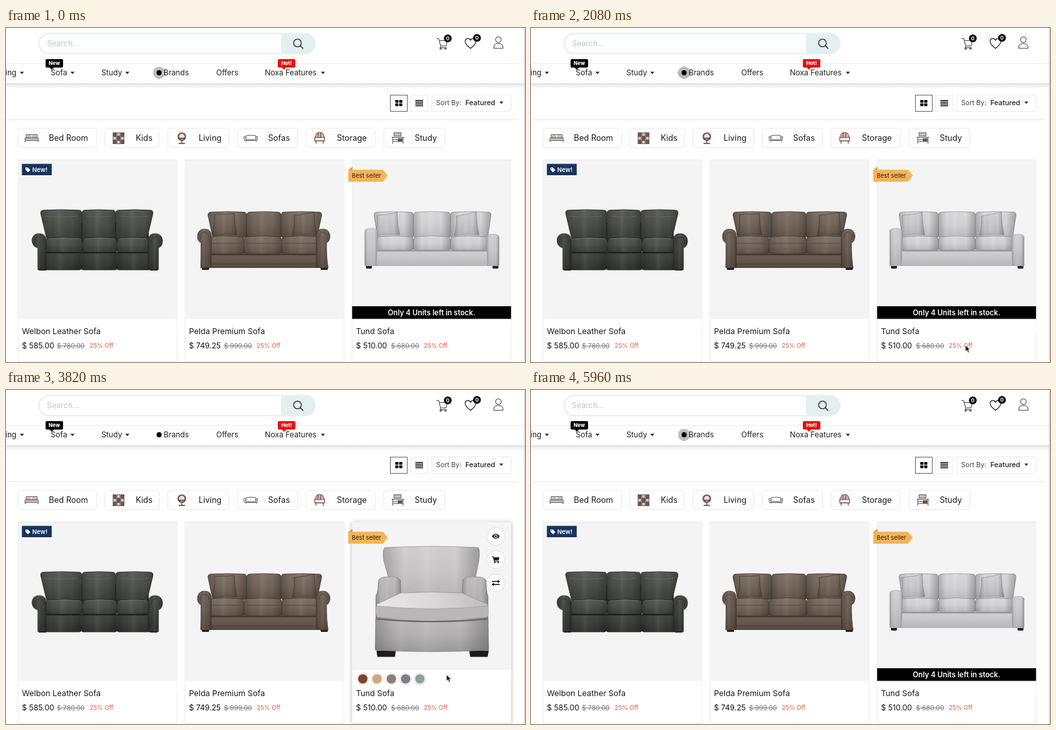
An HTML page for the animation above (6 s loop, 800 by 515 pixels).

```html
<!DOCTYPE html>
<html lang="en">
<head>
<meta charset="utf-8">
<title>Sofa shop</title>
<style>
html, body { margin: 0; width: 100%; height: 100%; overflow: hidden; background: #fff; }
svg { display: block; width: 800px; height: 515px; font-family: Inter, "Open Sans", sans-serif; }
#halo { transform-box: fill-box; transform-origin: center; }
</style>
</head>
<body>
<svg id="stage" viewBox="0 0 800 515" xmlns="http://www.w3.org/2000/svg"></svg>
<script>
const LOOP = 6000;
const stage = document.getElementById('stage');

// Drawing helpers return SVG markup.
const rect = (x, y, w, h, fill, r = 0, more = '') =>
  `<rect x="${x}" y="${y}" width="${w}" height="${h}" rx="${r}" fill="${fill}" ${more}/>`;
const circle = (x, y, r, fill, more = '') => `<circle cx="${x}" cy="${y}" r="${r}" fill="${fill}" ${more}/>`;
const path = (d, fill = 'none', more = '') => `<path d="${d}" fill="${fill}" ${more}/>`;
const line = (d, color, w = 1) => path(d, 'none', `stroke="${color}" stroke-width="${w}" stroke-linecap="round" stroke-linejoin="round"`);
const text = (x, y, s, size, fill = '#1b1b1b', more = '') =>
  `<text x="${x}" y="${y}" font-size="${size}" fill="${fill}" ${more}>${s}</text>`;
const group = (id, body, more = '') => `<g id="${id}" ${more}>${body}</g>`;
const at = (x, y, body) => `<g transform="translate(${x} ${y})">${body}</g>`;
const edge = (c, w = 1) => `stroke="${c}" stroke-width="${w}"`;
const caret = x => path(`M${x - 3.2} 67.5h6.4l-3.2 3.6z`, '#222');
const ramp = (id, ...stops) => `<linearGradient id="${id}" x1="0" y1="0" x2="0" y2="1">` +
  stops.map((c, i) => `<stop offset="${i / (stops.length - 1)}" stop-color="${c}"/>`).join('') + '</linearGradient>';

const defs = `<defs>
${ramp('headShade', '#dfe1e3', '#f4f5f5', '#fff')}
${ramp('leather', '#565853', '#4b4d48', '#3a3c38')}
${ramp('leatherLow', '#464843', '#3c3e3a', '#2f312e')}
${ramp('cloth', '#7d6f63', '#73655a', '#5f5248')}
${ramp('clothLow', '#6f6156', '#665850', '#544840')}
${ramp('linen', '#dadadc', '#d2d2d4', '#bdbdc0')}
${ramp('linenLow', '#d2d2d4', '#c8c8cb', '#b5b5b9')}
${ramp('wool', '#d2d0d0', '#c9c7c7', '#b8b6b6')}
${ramp('woolLow', '#bfbdbe', '#b3b1b2', '#9c9a9c')}
<linearGradient id="lit"><stop offset="0" stop-color="#e9e7e7"/><stop offset=".5" stop-color="#dad8d8"/><stop offset="1" stop-color="#bdbbbc"/></linearGradient>
<linearGradient id="sheen"><stop offset="0" stop-opacity=".2"/><stop offset=".22" stop-opacity="0"/><stop offset=".45" stop-color="#fff" stop-opacity=".07"/><stop offset=".75" stop-opacity="0"/><stop offset="1" stop-opacity=".25"/></linearGradient>
<filter id="soft" x="-10%" y="-10%" width="120%" height="120%"><feGaussianBlur stdDeviation="3"/></filter>
</defs>`;

function header() {
  const badge = (x, y) => circle(x, y, 6, '#000') + text(x, y + 2.8, 0, 8, '#fff', 'text-anchor="middle" font-weight="700"');
  const flag = (x, label, fill) => rect(x, 48, 27, 13, fill, 2) + path(`M${x + 6} 60.5h7l-3.5 4z`, fill) +
    text(x + 13.5, 57.4, label, 7.8, '#fff', 'text-anchor="middle" font-weight="800"');
  const nav = [[69, 'Sofa'], [147, 'Study'], [243, 'Brands'], [324, 'Offers'], [399, 'Noxa Features']];
  return path('M424 8h37a16 16 0 0 1 0 32h-37z', '#e5eff2') +
    rect(51, 8.5, 425, 31, 'none', 15.5, edge('#e7eef0', 2)) +
    text(63, 28, 'Search...', 12, '#c4c4c4') +
    circle(449.3, 23, 5.9, 'none', edge('#222', 1.3)) + line('M453.7 27.5l4 4', '#222', 1.4) +
    line('M664 16.2h3l3 11.6h8.3l2-8.5h-11.6M670 28.5l-1 2h10', '#333') +
    circle(670, 32, 1.2, 'none', edge('#333')) + circle(677.5, 32, 1.2, 'none', edge('#333')) + badge(681, 16) +
    line('M716 31.5C711 27.5 707.7 24.5 707.7 20.7c0-5 6-6.2 8.3-1.6 2.3-4.6 8.3-3.4 8.3 1.6 0 3.8-3.3 6.8-8.3 10.8z', '#222', 1.2) + badge(726, 15.3) +
    circle(759, 18, 4.3, 'none', edge('#444', 1.1)) + line('M752 31.3v-2.5c0-6.5 14-6.5 14 0v2.5z', '#444', 1.1) +
    rect(0, 54, 799, 1, '#ececec') + rect(0, 85, 799, 10, 'url(#headShade)') +
    text(16, 73, 'Living', 11.7, '#222', 'text-anchor="end"') +
    nav.map(([x, s]) => text(x, 73, s, 11.7, '#222')).join('') +
    [24.5, 102.5, 187, 488.5].map(caret).join('') +
    flag(61, 'New', '#000') + flag(419, 'Hot!', '#e3120f') +
    circle(236, 69, 10, '#000', 'id="halo"') + circle(236, 69, 3.9, '#000');
}

function toolbar() {
  const chips = [[18, 122, 66, 'Bed Room'], [152, 85, 200, 'Kids'], [249, 95, 297, 'Living'],
    [356, 94, 404, 'Sofas'], [462, 108, 510, 'Storage'], [582, 95, 630, 'Study']];
  const dark = '#4a4544', brown = '#7b5146';
  let grid = '';
  for (let i = 0; i < 9; i++) grid += rect(165 + i % 3 * 6, 161.5 + (i / 3 | 0) * 6, 5, 5, i % 2 ? '#d8c7bd' : brown, 0, edge(dark, .8));
  const bed = rect(29, 169.5, 21, 4, '#cdbdb5', 1, edge(dark, .8)) + line('M31 169v-4.5h17v4.5M29.5 174v1.5M49.5 174v1.5', dark) +
    rect(32.5, 166.5, 6, 2.5, '#e5dad5', 1, edge(dark, .6)) + rect(40.5, 166.5, 6, 2.5, '#e5dad5', 1, edge(dark, .6));
  const couch = line('M370 170v-4q7.500-1.500 15 0v4M367 167.500q2-1 2.500 1v3.500h16v-3.500q.500-2 2.500-1l-1 6h-19zM370 175v.5M386 175v.5', dark, .9);
  const icons = bed + grid + couch +
    circle(271, 167.5, 5.5, '#e9dfda', edge(brown, 2.2)) + line('M266 170h10M271 174v3M266.5 178h9', dark, 1.4) +
    path('M477 169q0-8 6.500-8t6.500 8z', '#d5b9ac', edge(brown, 1.2)) + line('M481 162v7M485 162v7M476 168v6h15v-6M478 174v4M489 174v4', brown, 1.3) +
    rect(598, 161.5, 11, 5, '#b9c3c5', 0, edge(dark, .8)) + line('M595 168.500h18M596 169v9M612 169v9M597 172h14M597 175h14', dark) + rect(604, 170, 7, 5, brown);
  return rect(592.5, 103.5, 26, 25, '#fff', 0, edge('#666')) +
    [[600, 111], [606, 111], [600, 116.2], [606, 116.2]].map(([x, y]) => rect(x, y, 5, 4.2, '#111', .6)).join('') +
    rect(623.5, 103.5, 27, 25, '#fff', 0, edge('#eee')) +
    [111, 113.7, 116.4, 119.1].map(y => rect(631, y, 12, 1.5, '#111')).join('') +
    rect(656.5, 103, 122, 25.5, '#fff', 1, edge('#ebebeb')) +
    text(663, 119.3, 'Sort By:', 10.4, '#444') + text(708, 119.3, 'Featured', 10.9, '#222', 'font-weight="500"') +
    path('M760.500 113.500h6l-3 3.600z', '#222') + rect(0, 141, 790, 1, '#e8e8ea') +
    chips.map(([x, w, tx, s]) => rect(x + .5, 154.5, w - 1, 30, '#fff', 4, edge('#e9e9e9')) + text(tx, 173.6, s, 12.5)).join('') + icons;
}

// A filled outline with soft shading toward both sides.
const padded = (d, fill, seam) => path(d, fill, edge(seam, .8)) + path(d, 'url(#sheen)');

// Cushions run between the x marks; the outer ones lean in by taper at the bottom.
function cushions(marks, y, h, fill, seam, dome = 1, taper = 0) {
  return marks.slice(1).map((b, i) => {
    const a = marks[i], low = y + h;
    const l = i ? a : a + taper, r = i < marks.length - 2 ? b : b - taper;
    return padded(`M${a + 3} ${y + 1}Q${(a + b) / 2} ${y - dome} ${b - 3} ${y + 1}Q${b} ${y + 2} ${b - .5} ${y + 6}L${r} ${low - 3}Q${r} ${low} ${r - 3} ${low}H${l + 3}Q${l} ${low} ${l} ${low - 3}L${a + .5} ${y + 6}Q${a} ${y + 2} ${a + 3} ${y + 1}z`, fill, seam);
  }).join('');
}
// Scroll arm: round top over a post that flares outward to the floor.
function arm(x, y, r, post, bottom, side, fill, seam) {
  const inner = x + side * r * .95, foot = x - side * post, neck = x - side * Math.min(post, r * .5);
  return padded(`M${foot} ${bottom}Q${neck} ${bottom - 14} ${neck} ${y + r * .9}C${x - side * r * 1.15} ${y + r * .8} ${x - side * r * 1.3} ${y - r} ${x} ${y - r}Q${inner} ${y - r} ${inner} ${y}L${inner} ${bottom}z`, fill, seam) +
    line(`M${x - side * r * .55} ${y + r * .45}q${-side * 2} ${-r} ${side * r * .6} ${-r}q${side * r * .6} ${r * .1} ${side * r * .5} ${r * .8}`, seam, .7);
}
const pillow = (x, y, lean, fill, seam) =>
  padded(`M${x - 16} ${y - 15 + lean}Q${x} ${y - 14} ${x + 15} ${y - 16 - lean}Q${x + 15} ${y} ${x + 19} ${y + 17}Q${x} ${y + 14} ${x - 19} ${y + 18}Q${x - 14} ${y} ${x - 16} ${y - 15 + lean}z`, fill, seam);
const legs = (xs, y, w, h, fill = '#27211e') => xs.map(x => path(`M${x} ${y}h${w}l-1.500 ${h}h${3 - w}z`, fill)).join('');

const darkSofa = () => legs([49, 221], 369, 14, 5) +
  rect(64, 300, 156, 30, '#2b2d2a') +
  cushions([53, 117, 169, 227], 280, 45, 'url(#leather)', '#262825', 1, 9) +
  cushions([56, 116, 171, 227], 343, 30, 'url(#leatherLow)', '#242623', 0) +
  line('M61 346.500h163', '#1c1e1b', 2) +
  cushions([61, 118, 171, 221], 323, 22.5, 'url(#leather)', '#242623', 2) +
  arm(51, 328.500, 11.5, 2, 372.5, 1, 'url(#leatherLow)', '#2b2d29') + arm(230, 328.500, 11.5, 5, 372.5, -1, 'url(#leatherLow)', '#2b2d29') +
  line('M59 290q24 3 51 0M124 290q20 3 38 0M176 290q22 3 44 0', '#686a63', .8) +
  line('M66 325q24-2 47 0M123 325q22-2 43 0M176 325q20-2 40 0', '#6a6c65', .9);

const brownSofa = () => legs([301, 484], 368, 13, 5) +
  cushions([311, 371, 424, 487], 283, 40, 'url(#cloth)', '#43382f', 1, 7) +
  pillow(337, 302, 0, 'url(#cloth)', '#4b3f36') + pillow(460, 302, 2, 'url(#cloth)', '#4b3f36') +
  rect(304, 344, 188, 26, 'url(#clothLow)', 2) + line('M311 349.500h175', '#392f28', 1.6) + line('M306 364h185', '#4a3f37', .9) +
  cushions([308, 367, 425, 490], 321, 27, 'url(#cloth)', '#43382f', 2) +
  line('M312 332h51M371 332h50M429 332h56', '#54483e', .8) +
  arm(306, 321, 11, 6, 369.5, 1, 'url(#clothLow)', '#4a3f37') + arm(488.5, 321, 11, 8, 369.5, -1, 'url(#clothLow)', '#4a3f37');

const paleSofa = () => legs([554, 749], 364, 11, 7) +
  cushions([567, 628, 685, 748], 283, 40, 'url(#linen)', '#99999d', 1, 5) +
  pillow(588, 302, 2, 'url(#linenLow)', '#97979b') + pillow(710, 302, 3, 'url(#linenLow)', '#97979b') +
  rect(553, 340, 207, 27, 'url(#linenLow)', 1) + line('M570 343.500h174', '#85858a', 1.6) +
  cushions([569, 628, 685, 744], 321, 21, 'url(#linen)', '#929296', 2) +
  padded('M553 366V313q1-4 9-4 9 0 11 4l-2 53z', 'url(#linenLow)', '#adadb1') +
  padded('M760 366V322q-1-4-9-4-8 0-10 4l1 44z', 'url(#linenLow)', '#adadb1');

const darkChair = () => legs([81, 186], 385, 17, 9, '#3a2a24') +
  cushions([86, 197], 259, 66, 'url(#leather)', '#2c2e2a', 1, 5) + line('M93 278q50 4 97 0', '#5f615a', .9) +
  rect(86, 345, 110, 42, 'url(#leatherLow)', 2) + line('M102 352h80', '#1c1e1b', 2.5) +
  cushions([99, 187], 318, 32, 'url(#leather)', '#242623', 3) + line('M105 321q38-4 76 0', '#6a6c65') +
  arm(83, 328, 17, 4, 387, 1, 'url(#leatherLow)', '#2b2d29') + arm(195, 328, 17, 4, 387, -1, 'url(#leatherLow)', '#2b2d29');

const paleChair = () => legs([571, 714], 402, 30, 9.5, '#1f1c1b') +
  padded('M584 243Q655 239 728 243Q731 246 729 262L718 320H598L582 262Q580 246 584 243z', 'url(#wool)', '#9b999a') +
  padded('M570 360V318Q574 310 574 294Q576 288 588 288 604 287 608 293L609 320 600 360z', 'url(#woolLow)', '#8f8d8e') +
  padded('M743 360V318Q740 310 740 294Q738 288 724 288 708 287 704 293L703 320 712 360z', 'url(#woolLow)', '#8f8d8e') +
  padded('M570 352H743L744 401Q656 406 569 401z', 'url(#woolLow)', '#8b898b') +
  path('M608 313q48-3 95 0l39 17q3 13 0 19-85 9-170 0-4-9 0-19z', 'url(#lit)', edge('#959394', .8)) +
  path('M571 333q85 9 172 0 2 10-1 17-85 8-170 0-3-8-1-17z', '#b9b7b8') +
  line('M571 333q85 9 172 0', '#a8a6a7') + line('M572 353q85 8 170 0', '#6d6a6b', 2.4);

// Quick action buttons, centred on x.
function actions(x) {
  const icons = [
    path('M-6 0Q0-7.500 6 0Q0 7.500-6 0z', '#111') + circle(0, 0, 2.6, '#fff') + circle(0, 0, 1.5, '#111'),
    line('M-6-4.500h2.200l1.600 7h6.700', '#111', 1.2) + path('M-3.500-3.500h9l-1.200 4.500h-6.800z', '#111') + circle(-1.5, 4.3, 1.2, '#111') + circle(3.7, 4.3, 1.2, '#111'),
    line('M-5.500-2.200h10M5.500 2.200h-10', '#111', 1.4) + path('M3-5l3.500 2.800-3.500 2.800zM-3 5l-3.500-2.800 3.500-2.800z', '#111')
  ];
  return icons.map((s, i) => at(x, 225.5 + i * 36, circle(0, 0, 14, '#fff', edge('#dedede')) + s)).join('');
}
const swatches = (x, colors) => colors.map((c, i) =>
  circle(x + i * 22, 445.5, 9, '#fff', edge('#d5d5d5')) + circle(x + i * 22, 445.5, 7.3, c)).join('');

function card(o) {
  const { id, x, name, price, was, sofa, chair, colors, extra = '', over = '' } = o;
  const hover = body => chair ? body() : '';
  const struck = text(x + 60.5, 493.6, was, 10.1, '#777', 'text-decoration="line-through"');
  return hover(() => group(id + 'Shade', rect(x, 204, 246, 310, '#000', 2, 'opacity=".28" filter="url(#soft)"'))) +
    rect(x + .5, 203.5, 245, 310.5, '#fff', 0, edge('#ececec')) + rect(x + .5, 204, 245, 244.5, '#f4f4f4') +
    group(id + 'Sofa', sofa()) + hover(() => group(id + 'Chair', chair()) +
      group(id + 'Panel', rect(x + 1, 431, 244.5, 18, '#fff')) + group(id + 'Dots', swatches(x + 17, colors))) +
    extra + text(x + 6.5, 472, name, 12.3) + text(x + 6.5, 493.8, price, 11.8, '#111') + struck +
    text(x + 111, 493.4, '25% Off', 9.3, '#e2583e') + over + hover(() => group(id + 'Acts', actions(x + 222)));
}

const newTag = rect(24.5, 209.5, 46, 17.5, '#17335f') + path('M30 215h3.500l4 4-3.500 3.500-4-4z', '#fff') + circle(31.7, 216.7, .7, '#17335f') +
  text(40.5, 222, 'New!', 9.4, '#fff', 'font-weight="600"');
const bestTag = path('M527.500 219l6.500-5v5z', '#d99a3c') + path('M527.500 218.500H581l7.500 9-7.500 9.500H527.500z', '#f5b455') + text(533, 231, 'Best seller', 9.2, '#222');
const stock = group('stock', rect(533.5, 429, 245, 19.5, '#000') +
  text(656, 443, 'Only 4 Units left in stock.', 11.2, '#fff', 'text-anchor="middle" font-weight="600"'));

const hand = path('M-1.200 5.500V1q0-1.500 1.200-1.500T1.300 1v3.200l4.500 1q1.400.5 1.200 2L6 11.500H.3L-4.300 7q-.3-1.800 1.200-1.500z', '#fff', edge('#222', .9)) + line('M2 6.500v2M4 6.800v2', '#444', .7);
const arrow = path('M0 0v9.800l2.300-2.100 1.700 3.900 1.900-.8-1.700-3.800h3.100z', '#111', edge('#fff', .7));

stage.innerHTML = defs + rect(0, 0, 800, 515, '#fff') + header() + toolbar() +
  card({ id: 'a', x: 18, name: 'Welbon Leather Sofa', price: '$ 585.00', was: '$ 780.00', sofa: darkSofa, chair: darkChair,
    colors: ['#7f8184', '#6b4439', '#a55f2c'], over: newTag }) +
  card({ id: 'b', x: 275.5, name: 'Pelda Premium Sofa', price: '$ 749.25', was: '$ 999.00', sofa: brownSofa }) +
  card({ id: 'c', x: 533, name: 'Tund Sofa', price: '$ 510.00', was: '$ 680.00', sofa: paleSofa, chair: paleChair,
    colors: ['#7d452c', '#cfa77c', '#8f7d75', '#7d8085', '#8ca396'], extra: stock, over: bestTag }) +
  rect(798.5, 0, 1.5, 515, '#d4d4d4') +
  group('cursor', group('arrow', arrow) + group('hand', hand));

// Steps are [time, value, easing]; the first and last values hold at the ends.
function play(id, prop, steps) {
  const all = [[0, steps[0][1]], ...steps, [LOOP, steps[steps.length - 1][1]]];
  document.getElementById(id).animate(
    all.map(([t, v, easing = 'linear']) => ({ offset: t / LOOP, [prop]: v, easing })),
    { duration: LOOP, iterations: Infinity }).startTime = 0;
}
const move = (x, y) => `translate(${x}px, ${y}px)`;

function hoverCard(id, start, end, shadeEnd) {
  const pulse = (off, on, up, down) => [[start, off, 'ease'], [start + up, on], [end, on, 'ease'], [end + down, off]];
  play(id + 'Sofa', 'opacity', pulse(1, 0, 200, 90));
  play(id + 'Chair', 'opacity', pulse(0, 1, 200, 90));
  play(id + 'Acts', 'opacity', pulse(0, 1, 220, 90));
  play(id + 'Dots', 'opacity', pulse(0, 1, 220, 150));
  play(id + 'Dots', 'transform', pulse(move(0, 16), move(0, 0), 220, 150));
  play(id + 'Panel', 'transform', pulse(move(0, 17.5), move(0, 0), 200, 90));
  play(id + 'Shade', 'opacity', [[start, 0, 'ease'], [start + 250, 1], [shadeEnd - 200, 1, 'ease'], [shadeEnd, 0]]);
}
hoverCard('a', 80, 1660, 1860);
hoverCard('c', 2080, 4170, 4560);
play('stock', 'opacity', [[2080, 1], [2200, 0], [4170, 0], [4250, 1]]);

play('halo', 'transform', [[0, 'scale(.95)'], [460, 'scale(1)'], [1240, 'scale(1)'], [1320, 'scale(.4)', 'ease-out'],
  [1860, 'scale(.95)'], [3080, 'scale(1)'], [5420, 'scale(.4)', 'ease-out'], [5960, 'scale(.95)']]);
play('halo', 'opacity', [[20, .26], [460, .09], [1240, 0], [1319, 0], [1320, .7], [1540, .52], [1860, .28], [2040, .28],
  [2380, .25], [3080, 0], [5419, 0], [5420, .7], [5640, .52], [5960, .26]]);

play('cursor', 'transform', [[20, move(172, 520), 'ease-out'], [420, move(177, 391)], [1320, move(177, 391), 'ease-in'],
  [1540, move(184.5, 455)], [1680, move(189, 525)], [2000, move(668, 525)], [2030, move(668, 520), 'ease-out'],
  [2380, move(675, 385)], [3560, move(675, 385), 'ease-in-out'], [3820, move(679, 439), 'ease-in'], [4140, move(682, 525)]]);
const handSpans = [[130, 1460], [2130, 3780]];
for (const [id, on] of [['hand', 1], ['arrow', 0]])
  play(id, 'opacity', handSpans.flatMap(([s, e]) => [[s, 1 - on], [s, on], [e, on], [e, 1 - on]]));
</script>
</body>
</html>
```
